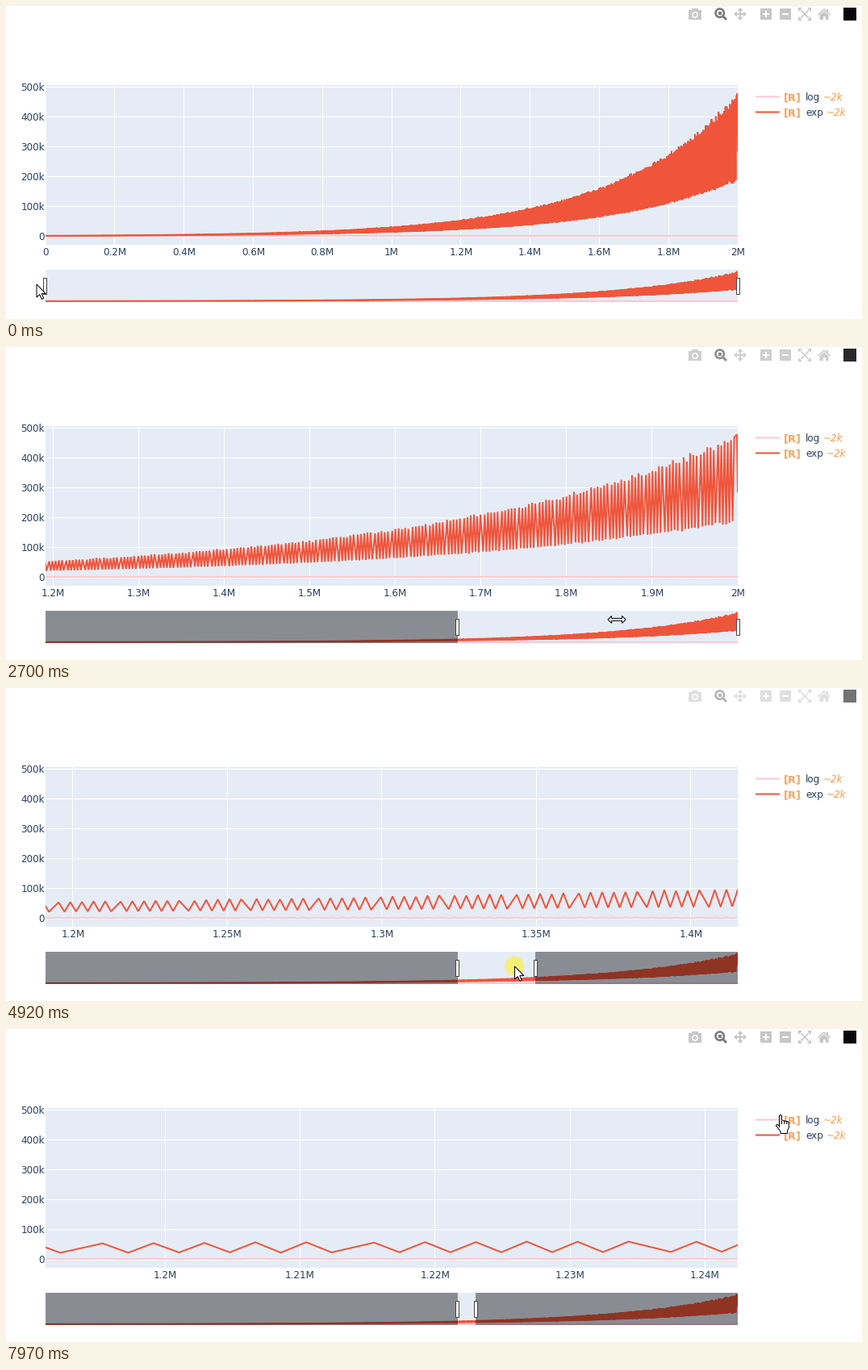
Animation, 1061 px wide and 388 px high, one loop 8000 ms. Source, as a matplotlib script:

```python
import numpy as np
import matplotlib.pyplot as plt
from matplotlib.animation import FuncAnimation
from matplotlib.patches import Circle, PathPatch, Polygon, Rectangle
from matplotlib.path import Path

W, H, DPI = 1061, 388, 64
STEP, LOOP = 40, 8000
PX = 72 / DPI  # points per pixel
X0, X1 = 49, 907
Y0, Y1 = 98, 296
S0, S1 = 327, 367
SPAN = 2  # full x range in millions
PANEL, INK, RED, PINK = "#E5ECF6", "#2a3f5f", "#EF553B", "#FFC6D0"
GREY, ACTIVE = "#c7c7c7", "#7c7c7c"

plt.rcParams["font.family"] = "DejaVu Sans"
plt.rcParams["path.simplify"] = False

# ---- data: a fast sine under an exponential, one extreme kept per bin
rng = np.random.default_rng(4)
PERIOD = 2 * np.pi * 200
BINS = 998
n = np.arange(BINS)
phase = np.where(n % 2, 0.75, 0.25)  # odd bins keep a valley, even ones a peak
start = n * 2e6 / BINS + 460
xs = (np.round(start / PERIOD - phase) + phase) * PERIOD / 1e6
level = np.where(n % 2, 0.395, 0.975) * rng.normal(1, 0.014, BINS)
level[-1] = 1
exp_y = 480 * np.exp(2.68 * (xs - SPAN)) * level
log_y = np.where(n % 2, 0.4, 2.3)
xs = np.r_[0, xs, SPAN]
exp_y = np.r_[1.5, exp_y, 287]
log_y = np.r_[1, log_y, 1]

# ---- motion: start, end, where the pointer goes, and the grip it drags
MOVES = [
    (30, 220, 49, 344, None),
    (480, 790, 327.7, 343, "lo"),
    (2060, 2340, 560, 343, "lo"),
    (2500, 2830, 907, 334, None),
    (3060, 4000, 661, 345, "hi"),
    (4800, 5000, 614, 345, "hi"),
    (5180, 5360, 603, 346, "hi"),
    (5400, 6070, 583, 349, "hi"),
    (6600, 6680, 582, 349, "hi"),
    (7160, 7440, 593, 285, None),
    (7460, 7800, 982, 122, None),
    (7800, 7960, 960, 106, None),
]
PRESSES = [(470, 880), (2050, 2420), (2960, 4110), (4790, 7000)]
FADE, LAG = 300, 80


def ease(t, t0, t1):
    u = np.clip((t - t0) / (t1 - t0), 0, 1)
    return u * u * (3 - 2 * u)


def follow(t, value, col, grip=None):
    for move in MOVES:
        if grip in (None, move[4]):
            value += (move[col] - value) * ease(t, *move[:2])
    return value


def toolbar_alpha(t):
    """The toolbar fades out on each press and back in on release."""
    return min(np.clip(max(1 - (t - p) / FADE, (t - r) / FADE), 0, 1)
               for p, r in PRESSES)


# ---- stage
fig = plt.figure(figsize=(W / DPI, H / DPI), dpi=DPI, facecolor="white")


def pixel_axes():
    ax = fig.add_axes([0, 0, 1, 1])
    ax.set(xlim=(0, W), ylim=(H, 0))
    ax.axis("off")
    return ax


def plot_axes(y0, y1, zero, per_k):
    ax = fig.add_axes([X0 / W, 1 - y1 / H, (X1 - X0) / W, (y1 - y0) / H])
    ax.set(xlim=(0, SPAN), ylim=((zero - y1) / per_k, (zero - y0) / per_k))
    ax.axis("off")
    for ys, color in ((log_y, PINK), (exp_y, RED)):
        ax.plot(xs, ys, color=color, lw=2 * PX, solid_joinstyle="bevel")
    return ax


back = pixel_axes()
main = plot_axes(Y0, Y1, 285.5, 0.37)
plot_axes(S0, S1, 366, 37 / 480)
top = pixel_axes()


def rect(x, y, w, h, color, ax=top, **kw):
    return ax.add_patch(Rectangle((x, y), w, h, fc=color, **{"lw": 0, **kw}))


def poly(pts, color=GREY):
    top.add_patch(Polygon(pts, fc=color, lw=0))


def line(x, y, color=GREY, width=2):
    top.plot(x, y, color=color, lw=width * PX, solid_capstyle="butt", snap=False)


def text(x, y, s, color=INK, size=12, **kw):
    return top.text(x, y, s, color=color, fontsize=size * PX, va="baseline", **kw)


for y0, y1 in ((Y0, Y1), (S0, S1)):
    rect(X0, y0, X1 - X0, y1 - y0, PANEL, back)
for k in range(6):
    rect(X0, 285 - 37 * k, X1 - X0, 1 if k else 2, "white", back)
    text(48, 290 - 37 * k, f"{k}00k" if k else "0", ha="right")
ticks = [(rect(0, Y0, 1, Y1 - Y0, "white", back), text(0, 309, "", ha="center"))
         for _ in range(12)]

for y, name, color, tail in ((112.5, "log", PINK, 1013), (131.5, "exp", RED, 1017)):
    line([929, 959], [y, y], color)
    text(964, y + 4.5, "[R]", "sandybrown", 13, weight="bold")
    text(991, y + 4.5, name)
    text(tail, y + 4.5, "~2k", "#fc9944", style="italic")


# ---- toolbar
def toolbar():
    # camera
    rect(846, 5, 16, 12, GREY)
    rect(850, 3, 8, 3, GREY)
    top.add_patch(Circle((854, 11), 3.2, fc=GREY, ec="white", lw=1.6 * PX))
    # magnifier
    top.add_patch(Circle((884.7, 8.7), 5.2, fc="none", ec=ACTIVE, lw=2.6 * PX))
    rect(883, 7, 4, 4, ACTIVE)
    line([888.5, 893], [12.5, 17], ACTIVE, 3)
    # four-way arrows
    line([904, 916], [10, 10])
    line([910, 910], [4, 16])
    for dx, dy in ((1, 0), (-1, 0), (0, 1), (0, -1)):
        tip = np.array([910 + 8 * dx, 10 + 8 * dy])
        base = tip - 4 * np.array([dx, dy])
        side = 3.5 * np.array([dy, dx])
        poly([tip, base + side, base - side])
    # plus and minus
    for x in (935, 959):
        rect(x, 3, 14, 14, GREY)
        rect(x + 3, 9, 8, 2, "white")
    rect(941, 6, 2, 8, "white")
    # diagonal arrows
    for sx in (-1, 1):
        line([990 - 5 * sx, 990 + 5 * sx], [5, 15], width=1.6)
        for sy in (-1, 1):
            x, y = 990 + 8 * sx, 10 + 8 * sy
            poly([(x, y), (x - 5 * sx, y), (x, y - 5 * sy)])
    # house
    line([1006.5, 1014, 1021.5], [11, 4, 11], width=1.6)
    poly([(1008.5, 11.2), (1014, 6.4), (1019.5, 11.2), (1019.5, 17), (1008.5, 17)])
    rect(1013, 13, 3, 4, "white")
    rect(1017, 4, 2, 4, GREY)

    rect(1038, 2, 16, 16, "#08080d")


toolbar()
veil = rect(840, 0, 218, 20, "white", zorder=4)

# ---- range slider
masks = [rect(X0, S0, 0, S1 - S0, "black", alpha=0.4, zorder=5) for _ in range(2)]
grips = [rect(0, 337.5, 4, 20, "white", ec="#444444", lw=PX, zorder=6, snap=False)
         for _ in range(2)]
halo = top.add_patch(Circle((0, 0), 12, fc="#fff23c", alpha=0.66, lw=0, zorder=7))


# ---- pointers
def shape(*parts):
    return Path.make_compound_path(
        *[Path(np.array([*p, p[0]], float), closed=True) for p in parts])


def box(w, h, x=0):
    return [(x - w / 2, -h / 2), (x + w / 2, -h / 2), (x + w / 2, h / 2), (x - w / 2, h / 2)]


def half_arrow(s):
    return [(10.5 * s, 0), (6.5 * s, -4), (6.5 * s, -0.6), (3.5 * s, -0.6),
            (3.5 * s, 0.6), (6.5 * s, 0.6), (6.5 * s, 4)]


def double_arrow(w, h, neck, shaft):
    right = [(neck, -shaft), (neck, -h), (w, 0), (neck, h), (neck, shaft)]
    return right + [(-x, -y) for x, y in right]


ARROW = [(0, 0), (0, 16), (3.7, 12.6), (6.3, 18.4), (8.8, 17.3), (6.2, 11.6),
         (11.3, 11.6)]
HAND = [(-1.5, 15.5), (-1.5, 1.5), (0, 0.3), (1.5, 1.5), (1.5, 7), (10, 9), (10.5, 16),
        (8.5, 20), (8.5, 23.5), (0, 23.5), (0, 21), (-5.7, 13.5), (-4, 12), (-1.5, 14.5)]
creases = [[(x, 8), (x, 12)] for x in (1.5, 4.7, 7.7)]

CURSORS = {  # path, fill, outline width
    "arrow": (shape(ARROW), "white", 1),
    "ew": (shape(double_arrow(11, 4.5, 6.5, 1.5)), "white", 1),
    "col": (shape(box(1.4, 13, -1.3), box(1.4, 13, 1.3), half_arrow(-1), half_arrow(1)),
            "black", 0.2),
    "cross": (shape(box(22, 1), box(1, 22)), "black", 0),
    "hand": (shape(HAND, *creases), "white", 1),
}
pointer = top.add_patch(PathPatch(CURSORS["arrow"][0], ec="black", zorder=8))


def cursor_kind(x, y, pressed, edges):
    if pressed:
        return "arrow"
    if S0 <= y <= S1 and 44 <= x <= 912:
        return "col" if min(abs(x - e) for e in edges) < 5 else "ew"
    if Y0 <= y <= Y1 and X0 <= x <= X1:
        return "cross"
    if 929 <= x <= 1045 and 100 <= y <= 140:
        return "hand"
    return "arrow"


def draw_axis(lo, hi):
    rough = (hi - lo) / 10
    mag = 10 ** np.floor(np.log10(rough))
    step = next(m * mag for m in (1, 2, 5, 10) if m * mag >= rough * (1 - 1e-6))
    first = np.ceil(lo / step - 1e-6)
    main.set_xlim(lo, hi)
    for i, (rule, label) in enumerate(ticks):
        v = (first + i) * step
        x = X0 + (v - lo) / (hi - lo) * (X1 - X0)
        shown = v <= hi + 1e-6
        rule.set_visible(shown)
        label.set_visible(shown)
        rule.set_x(np.floor(x + 1e-6))
        label.set_x(x)
        label.set_text(f"{v:.4g}M" if v > 0 else "0")


def update(i):
    t = i * STEP
    a = follow(t - LAG, X0, 2, "lo")
    b = follow(t - LAG, X1, 2, "hi")
    draw_axis(*[(p - X0) / (X1 - X0) * SPAN for p in (a, b)])

    masks[0].set_width(a - X0)
    masks[1].set_x(b)
    masks[1].set_width(X1 - b)
    grips[0].set_x(round(a) - 2.5)
    grips[1].set_x(round(b) - 1.5)
    veil.set_alpha(1 - toolbar_alpha(t))

    x, y = follow(t, 38, 2), follow(t, 345, 3)
    pressed = any(p <= t < r for p, r in PRESSES)
    halo.set_visible(pressed)
    halo.center = (x - 0.5, y - 0.5)
    path, fill, width = CURSORS[cursor_kind(x, y, pressed, (a, b))]
    pointer.set_path(Path(path.vertices + [x, y], path.codes))
    pointer.set(facecolor=fill, linewidth=width * PX)
    return []


anim = FuncAnimation(fig, update, frames=LOOP // STEP, interval=STEP,
                     repeat=True, repeat_delay=0, blit=False)
plt.show()
```
